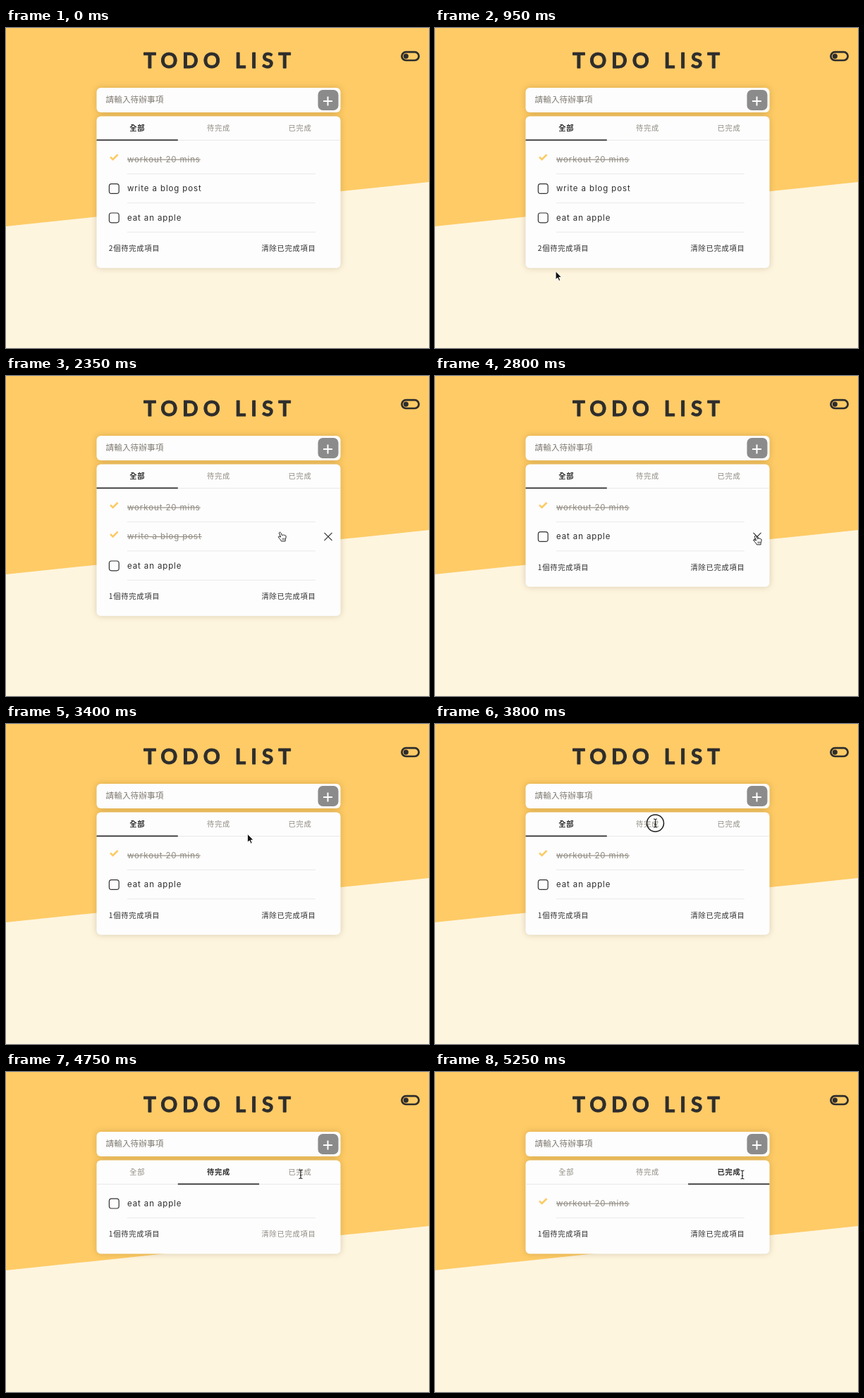
These frames come from a looping animation (600x455 px, 5.3 s). An HTML page:

```html
<!DOCTYPE html>
<html lang="zh-Hant">
<head>
<meta charset="utf-8">
<title>Todo list</title>
<style>
html, body { margin: 0; width: 100%; height: 100%; overflow: hidden; background: #fef5df; }
svg { display: block; width: 600px; height: 455px; }
text { font-family: "Noto Sans CJK TC", "Noto Sans CJK", sans-serif; fill: #2d2d2d; }
.title { font: 700 29.8px Lato, sans-serif; letter-spacing: 6.9px; text-anchor: middle;
  stroke: #2d2d2d; stroke-width: .9; stroke-linejoin: round; }
.hint { font-size: 11.7px; fill: #817c72; }
.small { font-size: 10.3px; letter-spacing: .7px; }
.mid { text-anchor: middle; }
.end { text-anchor: end; }
.bold { font-weight: 700; }
.muted { fill: #908b80; }
.item { font: 400 11.5px Inter, "Noto Sans", sans-serif; letter-spacing: .88px; }
.done { fill: #908b80; text-decoration: line-through; }
.card { fill: #fdfdfe; filter: drop-shadow(0 0 5px rgba(90, 65, 10, .24)); }
.rule { stroke: #e9e9ea; }
.ink { fill: none; stroke: #333; stroke-width: 1.2; }
.tick { fill: none; stroke: #fdca63; stroke-width: 2.5; }
.pointer { fill: #fff; stroke: #222; stroke-width: 1; stroke-linejoin: round; }
</style>
</head>
<body>
<svg viewBox="0 0 600 455">
  <rect width="600" height="455" fill="#fef5df"/>
  <path d="M0 0H600V219L0 282Z" fill="#fecb66"/>
  <text class="title" x="303" y="57">TODO LIST</text>
  <rect x="561.4" y="34.2" width="24.2" height="11.8" rx="5.9" fill="none" stroke="#2d2d2d" stroke-width="2.7"/>
  <circle cx="567.3" cy="40.1" r="3.6" fill="#2d2d2d"/>
  <rect class="card" x="128.5" y="85" width="346" height="35" rx="6"/>
  <text class="hint" x="141.5" y="106.3">請輸入待辦事項</text>
  <rect x="442.5" y="88" width="29" height="29" rx="7" fill="#8b8b8b"/>
  <path d="M450 104H463M456.5 97.5V110.5" stroke="#fff" stroke-width="2"/>
  <g id="live"></g>
</svg>
<script>
const LOOP = 5300, STEP = 50, ROW = 41.4;
const CHECKED = 1700, REMOVED = 2750, PENDING = 3900, FINISHED = 5100;
const TABS = ["全部", "待完成", "已完成"];
const tabX = i => 186 + 115.3 * i;
const rowY = i => 187 + ROW * i;

// time, x, y, upward bow on the way there
const PATH = [
  [900, 176, 358, 0], [1250, 160, 264, 0], [1400, 160, 264, 0], [1550, 152.5, 235.5, 0],
  [1900, 152.5, 235.5, 0], [2543, 457.5, 233.5, 8.6], [3050, 457.5, 233.5, 0],
  [3550, 316, 144, 0], [3600, 316, 144, 0], [3750, 312.5, 141, 0], [3950, 312.5, 141, 0],
  [4200, 321, 142, 0], [4400, 321, 142, 0], [4850, 432, 146, 0], [4950, 436, 146, 0],
  [5300, 436, 146, 0]
];
const CLICKS = [1650, 2650, 3800, 5000];

function cursorAt(t) {
  const i = PATH.findIndex(p => p[0] > t);
  if (i < 1) return null;
  const [t0, x0, y0] = PATH[i - 1], [t1, x1, y1, bow] = PATH[i];
  const u = (t - t0) / (t1 - t0), e = u * u * (3 - 2 * u);
  return {
    x: x0 + (x1 - x0) * e,
    y: y0 + (y1 - y0) * e - bow * Math.sin(Math.PI * e)
  };
}

function itemsAt(t) {
  const list = [{ name: "workout 20 mins", done: true }];
  if (t < REMOVED) list.push({ name: "write a blog post", done: t >= CHECKED });
  list.push({ name: "eat an apple", done: false });
  return list;
}

function drawItem(item, i, hover) {
  const y = rowY(i);
  const box = item.done
    ? `<path class="tick" d="M148 ${y - 3.6}l3.6 3.6l7 -7"/>`
    : `<rect class="ink" x="146.4" y="${y - 6.8}" width="13.8" height="13.8" rx="3.2"/>`;
  const cross = hover ? `<path class="ink" d="M451.5 ${y - 5.5}l11 11m0 -11l-11 11"/>` : "";
  return box + cross +
    `<text class="item ${item.done ? "done" : ""}" x="172" y="${y + 3.8}">${item.name}</text>` +
    `<path class="rule" d="M172 ${y + 20.4}H439"/>`;
}

const SHAPES = {
  hand: `<path class="pointer" d="M-1.8 .5L-4 -4.5q-.5 -1.6 .8 -1.9q1 -.2 1.6 1.2L-.2 -2q.6 -1.2 1.5 -.2
    q.8 -1 1.7 .1q.9 -.7 1.6 .4q1.1 -.2 1 1.3q0 2.5 -1 4.5v2.2h-5.8q-.6 -1.8 -2 -3.2q-2 -1.9 -2 -3
    q.3 -1.1 1.6 -.5z"/><path d="M.5 2v2.6M2.1 2v2.6M3.6 2v2.4" stroke="#222" stroke-width=".7"/>`,
  beam: `<path d="M-2.5 -6q2 0 2.5 1q.5 -1 2.5 -1M0 -5V5M-2.5 6q2 0 2.5 -1q.5 1 2.5 1M-1.2 1.5h2.4"
    fill="none" stroke="#222" stroke-width="1.1"/>`,
  arrow: `<path d="M-4 -7V5l2.8 -2.5l1.9 4.3l2 -.9l-1.9 -4.2h3.7z" fill="#111" stroke="#fff" stroke-width=".9"/>`
};

function drawCursor(c, t, overRow) {
  const overTab = c.y > 128 && c.y < 160 && TABS.some((_, i) => Math.abs(c.x - tabX(i)) < 24);
  const shape = overRow ? "hand" : overTab ? "beam" : "arrow";
  const ring = CLICKS.some(k => t >= k && t < k + 100)
    ? `<circle r="12" fill="none" stroke="#1c1c1c" stroke-width="1.5"/>` : "";
  return `<g transform="translate(${c.x} ${c.y})">${SHAPES[shape]}${ring}</g>`;
}

function draw(t) {
  const tab = t >= FINISHED ? 2 : t >= PENDING ? 1 : 0;
  const items = itemsAt(t);
  const shown = items.filter(it => tab === 0 || it.done === (tab === 2));
  const left = items.filter(it => !it.done).length;
  const end = rowY(shown.length - 1) + 20.4;
  const c = cursorAt(t);
  const hover = c && c.x > 129 && c.x < 474 ? Math.floor((c.y - 166.3) / ROW) : -1;

  let out = `<rect class="card" x="128.5" y="125.5" width="346" height="${end + 51 - 125.5}" rx="6"/>`;
  out += `<path class="rule" d="M128.5 159.5H474.5"/>`;
  TABS.forEach((name, i) => {
    out += `<text class="small mid ${i === tab ? "bold" : "muted"}" x="${tabX(i) + .3}" y="146">${name}</text>`;
  });
  out += `<path d="M${128.5 + 115.3 * tab} 159.4h115.3" stroke="#2d2d2d" stroke-width="1.6"/>`;
  out += shown.map((it, i) => drawItem(it, i, i === hover)).join("");
  out += `<text class="small" x="145.8" y="${end + 26.8}">${left}個待完成項目</text>`;
  out += `<text class="small end ${tab === 1 ? "muted" : ""}" x="439.6" y="${end + 26.8}">清除已完成項目</text>`;
  if (c) out += drawCursor(c, t, hover >= 0 && hover < shown.length);
  return out;
}

const live = document.getElementById("live");
const start = performance.now();
let last = -1;

function tick() {
  const t = Math.floor((performance.now() - start) % LOOP / STEP) * STEP;
  if (t !== last) live.innerHTML = draw(last = t);
  requestAnimationFrame(tick);
}
tick();
</script>
</body>
</html>
```
